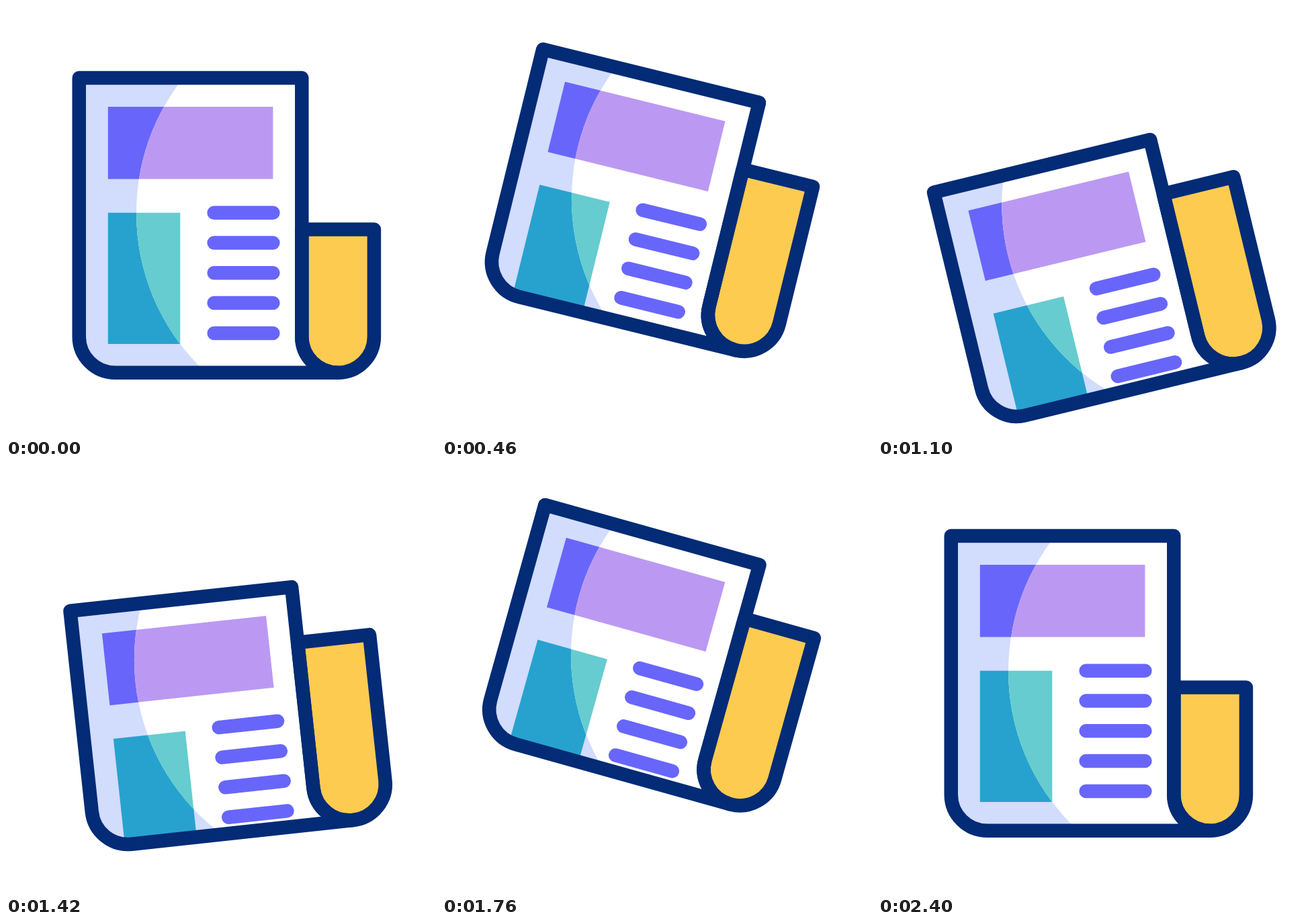
Recreate the animation shown at these times as an HTML page with a canvas. Size 640 px wide and 640 px high, loop 2420 ms.

```html
<!DOCTYPE html>
<html lang="en">
<head>
<meta charset="utf-8">
<title>Newspaper</title>
<style>
  html, body { margin: 0; width: 100%; height: 100%; overflow: hidden; background: #fff; }
  canvas { display: block; }
</style>
</head>
<body>
<canvas id="stage" width="640" height="640"></canvas>
<script>
const ctx = document.getElementById('stage').getContext('2d');
const LOOP = 2420, SEGMENT = 600;
const NAVY = '#032b76', INDIGO = '#6866fa';
const LEFT = 108.75, FOLD = 440.3, RIGHT = 547.9, CURVE_Y = 492, RADIUS = 53.8;
const PIVOT = { x: 328, y: 326.4 };

// Keys sit 600 ms apart, with smooth easing between them.
function track(keys, time) {
  const pos = Math.min(time / SEGMENT, keys.length - 1);
  const i = Math.min(Math.floor(pos), keys.length - 2);
  const p = pos - i;
  return keys[i] + (keys[i + 1] - keys[i]) * p * p * (3 - 2 * p);
}

function pagePath(top) {
  const path = new Path2D();
  path.moveTo(FOLD, top);
  path.lineTo(LEFT, top);
  path.lineTo(LEFT, CURVE_Y);
  path.arc(LEFT + RADIUS, CURVE_Y, RADIUS, Math.PI, Math.PI / 2, true);
  path.arc(FOLD + RADIUS, CURVE_Y, RADIUS, Math.PI / 2, Math.PI);
  path.closePath();
  return path;
}

function rollPath(top) {
  const path = new Path2D();
  path.moveTo(FOLD, top);
  path.lineTo(RIGHT, top);
  path.arc(RIGHT - RADIUS, CURVE_Y, RADIUS, 0, Math.PI);
  path.closePath();
  return path;
}

function fillBlocks(paper, banner, picture, dx, dy) {
  ctx.fillStyle = paper;
  ctx.fillRect(0, 0, 640, 640);
  ctx.fillStyle = banner;
  ctx.fillRect(151.8 + dx, 150 + dy, 245.6, 107.5);
  ctx.fillStyle = picture;
  ctx.fillRect(151.8 + dx, 307.7 + dy, 107.5, 195.3);
}

function drawContent(dx, dy) {
  fillBlocks('#d2dcfd', INDIGO, '#27a2ce', dx, dy);

  ctx.save();
  ctx.beginPath();
  ctx.arc(518.5, 308, 324.5, 0, 2 * Math.PI);
  ctx.clip();
  fillBlocks('#fff', '#bb99f2', '#66cccf', dx, dy);
  ctx.restore();

  ctx.strokeStyle = INDIGO;
  ctx.beginPath();
  for (let i = 0; i < 5; i++) {
    const y = 307.7 + i * 44.8 + dy;
    ctx.moveTo(309.6 + dx, y);
    ctx.lineTo(397.4 + dx, y);
  }
  ctx.stroke();
}

function draw(time) {
  const angle = track([0, 16, -16, 16, 0], time) * Math.PI / 180;
  const lift = track([0, -77.5, 39.2, -77.5, 0], time);
  const squash = track([0, 1, 1, 1, 0], time);
  const page = pagePath(107 + 84 * squash);
  const roll = rollPath(332.5 - 58.4 * squash);

  ctx.clearRect(0, 0, 640, 640);
  ctx.save();
  ctx.translate(PIVOT.x, PIVOT.y + lift);
  ctx.rotate(angle);
  ctx.translate(-PIVOT.x, -PIVOT.y);
  ctx.lineWidth = 20.5;
  ctx.lineCap = ctx.lineJoin = 'round';

  ctx.save();
  ctx.clip(page);
  drawContent(0.5 * squash, 79.5 * squash);
  ctx.restore();

  ctx.fillStyle = '#fdcb50';
  ctx.fill(roll);
  ctx.strokeStyle = NAVY;
  ctx.stroke(page);
  ctx.stroke(roll);
  ctx.restore();
}

const start = performance.now();
function tick() {
  draw((performance.now() - start) % LOOP);
  requestAnimationFrame(tick);
}
tick();
</script>
</body>
</html>
```
